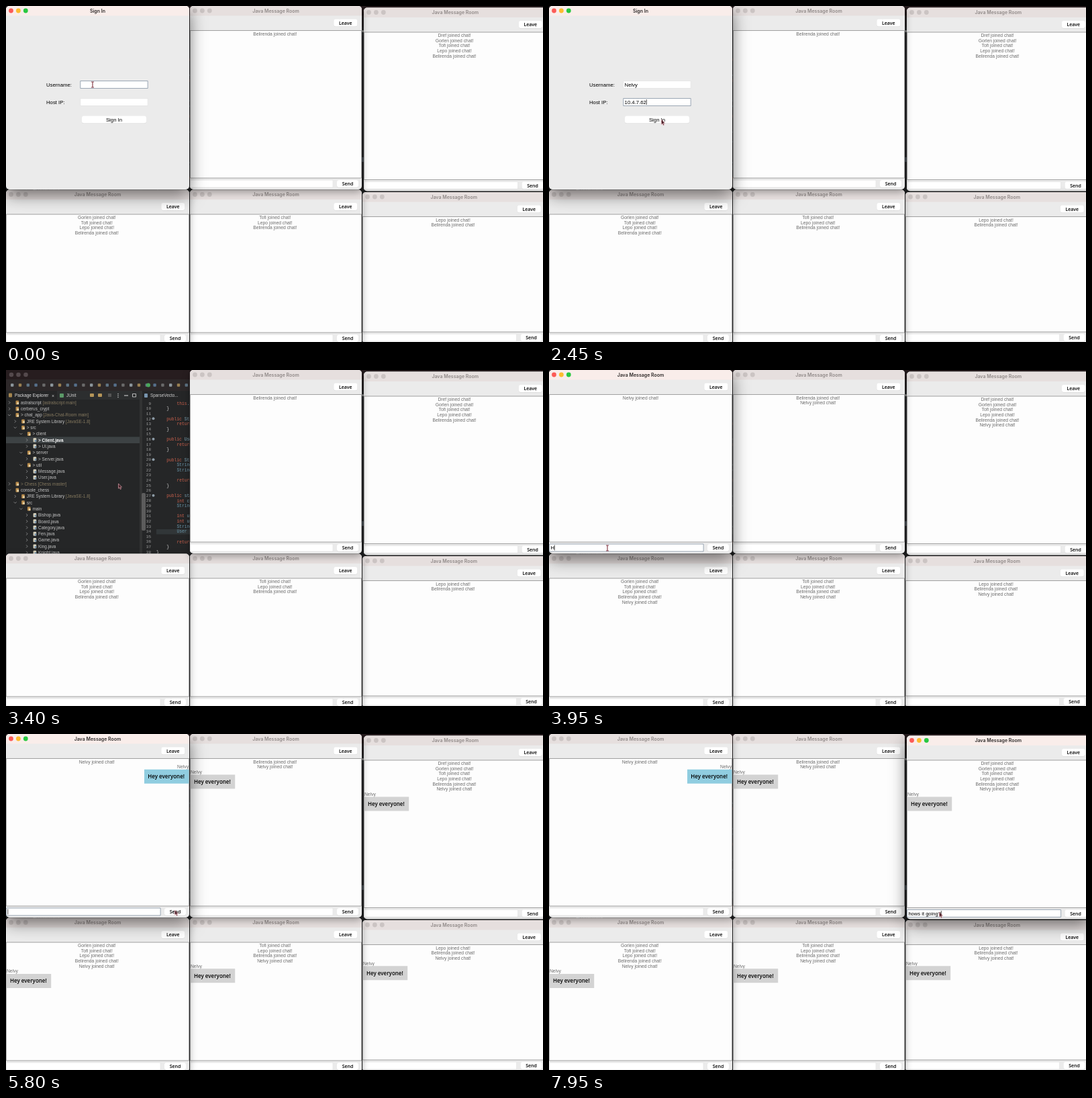
Animation of 800x500 px, one loop 8 s. Source, as an HTML page with a canvas:

```html
<!DOCTYPE html>
<html>
<head>
<meta charset="utf-8">
<style>
html, body { margin: 0; width: 100%; height: 100%; overflow: hidden; background: #221d1f; }
canvas { display: block; }
</style>
</head>
<body>
<canvas id="stage" width="800" height="500"></canvas>
<script>
const c = document.getElementById('stage').getContext('2d');
const LOOP = 8000;
const SANS = '"Liberation Sans", Arial, sans-serif';
const HUMAN = '"Open Sans", sans-serif';
const TITLE = 'Inter, sans-serif';
const MONO = '"Liberation Mono", monospace';

const USER = 'Nelvy', HOST = '10.4.7.62';
const HELLO = 'Hey everyone!', REPLY = 'hows it going?';
const CLOSE_AT = 3250, JOIN_AT = 3450, SEND_AT = 5750, SWITCH_AT = 6250;

const joined = ['Dref', 'Gorlen', 'Tofi', 'Lepo', 'Belirenda'];
// first: index of the first join notice the room has seen
const rooms = [
  { x: 0, y: 0, w: 273, h: 273, first: 5 },
  { x: 274, y: 0, w: 256, h: 273, first: 4 },
  { x: 533, y: 2.5, w: 272.5, h: 273, first: 0 },
  { x: 0, y: 273.5, w: 273, h: 229.5, first: 1 },
  { x: 274, y: 273.5, w: 256, h: 229.5, first: 2 },
  { x: 531, y: 277, w: 272.5, h: 225, first: 3 },
];
const backToFront = [2, 5, 4, 3, 1, 0];

// time, x, y of the pointer
const pointerPath = [
  [950, 129, 117], [1500, 133, 143], [2150, 133, 143], [2430, 168, 169],
  [3400, 168, 169], [3800, 87, 265], [5300, 87, 265], [5650, 252, 262],
  [5850, 252, 262], [6230, 582, 265],
];

const tree = [
  '0>astralscript| [astralscript main]', '0>cerberus_crypt', '0v> chat_app| [Java-Chat-Room main]',
  '1>JRE System Library| [JavaSE-1.8]', '1v> src', '2v> client', '3>> Client.java', '3>> UI.java',
  '2v> server', '3>> Server.java', '2v> util', '3>Message.java', '3>User.java',
  '0>|> Chess [Chess master]', '0vconsole_chess', '1>JRE System Library| [JavaSE-1.8]', '1vsrc', '2vmain',
  ...['Bishop', 'Board', 'Category', 'Fen', 'Game', 'King', 'Knight'].map(n => `3>${n}.java`),
];

const code = `        this.
    }

    public String
        return
    }

    public User
        return
    }

    public String
        String
        String

        return
    }

    public static
        int c
        String

        int u
        int u
        String
        User

        return
    }
}`.split('\n');

function rect(x, y, w, h, fill, radius = 0, stroke) {
  c.beginPath();
  c.roundRect(x, y, w, h, radius);
  if (fill) { c.fillStyle = fill; c.fill(); }
  if (stroke) { c.strokeStyle = stroke; c.lineWidth = 0.8; c.stroke(); }
}

function dot(x, y, r, fill) {
  c.beginPath();
  c.arc(x, y, r, 0, 7);
  c.fillStyle = fill;
  c.fill();
}

function line(points, color, width) {
  c.beginPath();
  points.forEach(([x, y]) => c.lineTo(x, y));
  c.strokeStyle = color;
  c.lineWidth = width;
  c.stroke();
}

// y is the middle of the capitals; returns the width
function text(s, x, y, size, family, color = '#111', align = 'left', weight = 400) {
  c.font = `${weight} ${size}px ${family}`;
  c.textAlign = align;
  c.fillStyle = color;
  c.fillText(s, x, y + size * 0.36);
  return c.measureText(s).width;
}

function button(label, x, y, w, family, size, weight) {
  rect(x - w / 2, y - 5.2, w, 11.2, '#d2d2d2', 3);
  rect(x - w / 2, y - 5.5, w, 11, '#fff', 3);
  text(label, x, y, size, family, '#000', 'center', weight);
}

function field(x, y, w, value, focused, caret, size) {
  rect(x, y - 5.5, w, 11, '#fff', 0, focused ? '#8593a4' : '#e4e4e4');
  const end = x + 1.8 + text(value, x + 1.8, y, size, SANS, '#000');
  if (caret) line([[end + 0.4, y - 4], [end + 0.4, y + 4]], '#111', 0.7);
}

function frame({ x, y, w, h }, title, active) {
  c.save();
  c.shadowColor = active ? 'rgba(0,0,0,.55)' : 'rgba(0,0,0,.35)';
  c.shadowBlur = active ? 24 : 12;
  c.shadowOffsetY = active ? 8 : 4;
  rect(x, y, w, h, '#ebebeb', 5);
  c.restore();
  rect(x, y, w, 14.5, active ? '#f9edea' : '#e6dfde', [5, 5, 0, 0]);
  const lights = active ? ['#fc5b57', '#fdbc2e', '#28c840'] : Array(3).fill('#cbc4c3');
  lights.forEach((color, i) => dot(x + 7.5 + i * 10.9, y + 7, 3.4, color));
  text(title, x + w / 2, y + 7, 7, TITLE, active ? '#2c2827' : '#8f8887', 'center', 600);
}

function room(r, t, own, active, draft, focused) {
  const { x, y, w, h } = r, right = x + w, bottom = y + h, top = y + 36.5;
  const sent = t >= SEND_AT;
  frame(r, 'Java Message Room', active);
  button('Leave', right - 24.2, y + 25, 35, HUMAN, 7, 600);
  rect(x + 0.4, top, w - 0.8, bottom - 17 - top, '#fdfdfd', 0, '#8b8b8b');

  const lines = joined.slice(r.first);
  if (t >= JOIN_AT) lines.push(USER);
  const lineY = i => top + 4.7 + i * 7.65;
  const middle = x + w / 2 - (own && !sent ? 0 : 1.2);
  lines.forEach((name, i) => text(`${name} joined chat!`, middle, lineY(i), 6.75, SANS, '#6c6c6c', 'center'));

  if (sent) {
    const ly = lineY(lines.length), left = own ? right - 67 : x + 0.7;
    text(USER, own ? right - 1 : x + 1, ly, 6.75, SANS, '#6c6c6c', own ? 'right' : 'left');
    rect(left, ly + 4, 66.5, 21, own ? '#90cde0' : '#d3d3d3');
    text(HELLO, left + 5.3, ly + 14.5, 8, HUMAN, '#000', 'left', 600);
  }
  field(x + 0.6, bottom - 8.5, w - 43.5, draft, focused, focused, 7.6);
  button('Send', right - 21, bottom - 8.5, 32, HUMAN, 7, 600);
}

function signIn(t) {
  const onHost = t >= 1700;
  const blink = t < 2600 || (t >= 2825 && t < 3000);
  frame(rooms[0], 'Sign In', true);
  text('Username:', 60, 117, 7.75, SANS, '#000');
  text('Host IP:', 60, 143, 7.75, SANS, '#000');
  field(110.8, 117, 100.4, typed(USER, 300, 100, t), !onHost, !onHost && t >= 100, 7.75);
  field(110.8, 143, 100.4, typed(HOST, 1950, 40, t), onHost, onHost && blink, 7.75);
  button('Sign In', 161, 169, 96, SANS, 7.75);
}

function editor() {
  rect(0, 0, 800, 500, '#252627');
  rect(0, 0, 800, 14, '#271d1f');
  rect(0, 14, 800, 17, '#2d2829');
  rect(0, 31, 800, 13, '#2c2e2f');
  [8, 18.5, 29.5].forEach(x => dot(x, 7, 3.3, '#54494c'));

  const hues = ['#8d979d', '#5f7586', '#6b6b6b', '#9b8152', '#56708c'];
  for (let i = 0; i < 23; i++) rect(7 + i * 11.8, 20.3, 4.4, 4.4, hues[i * 3 % 5], 1);
  dot(212, 22.5, 3, '#4aa85a');

  rect(0, 31, 76, 13, '#252627');
  rect(4, 34.5, 5, 6, '#a5864f', 1);
  text('Package Explorer', 13, 38, 6.4, SANS, '#e0e0e0');
  text('×', 68, 38, 7, SANS, '#ccc');
  rect(80, 35, 6, 6, '#5b9a68', 1);
  text('JUnit', 90, 38, 6.4, SANS, '#d0d0d0');
  [125, 137].forEach(x => rect(x, 35, 6, 5, '#b59659', 1));
  rect(152, 35, 5, 5, '#555');
  [35.5, 38, 40.5].forEach(y => dot(167, y, 0.7, '#ddd'));
  line([[176, 38], [182, 38]], '#ddd', 1);
  rect(188.5, 35.5, 5, 4.5, null, 0, '#ddd');

  tree.forEach((row, i) => {
    const depth = +row[0], y = 48.5 + i * 9.3, x = 5 + depth * 8.7;
    const [name, note = ''] = row.slice(2).split('|');
    if (i === 6) rect(0, y - 4.7, 199, 9.3, '#3d4244');
    const mark = row[1] === 'v' ? [[-2, -1], [0, 1], [2, -1]] : [[-1, -2], [1, 0], [-1, 2]];
    line(mark.map(([a, b]) => [x + a, y + b]), '#999', 0.8);
    rect(x + 9.5, y - 3, 4.6, 6, depth > 2 ? '#d6d0bb' : '#b98c4c', 1);
    rect(x + 11.5, y - 0.5, 2.6, 3, depth > 2 ? '#7794ae' : '#e4d5ae');
    const w = text(name, x + 17, y, 6.4, SANS, i === 6 ? '#fff' : '#c4c4c4', 'left', i === 6 ? 700 : 400);
    text(note, x + 17 + w, y, 6.4, SANS, '#85795f');
  });

  rect(199, 31, 4, 243, '#323333');
  rect(202, 183, 6, 56, '#5c5c5c', 2);
  rect(203, 31, 71, 13, '#252627');
  rect(206, 35, 5, 6, '#7794ae', 1);
  text('SparseVecto...', 215, 38, 6.4, SANS, '#d0d0d0');
  rect(224, 237, 50, 7.6, '#313638');
  code.forEach((s, i) => {
    const y = 49.5 + i * 7.62, word = s.trim();
    text(i + 9, 216, y, 6, MONO, '#a0a0a0', 'right');
    if (/^public/.test(word)) dot(219.5, y, 2, '#8c9aa5');
    const keyword = /^(public|return|int|this)/.exec(word);
    const color = keyword ? '#c9604c' : /^[SU]/.test(word) ? '#6a96aa' : '#d0d0d0';
    const x = 224 + (s.length - s.trimStart().length) * 3.8;
    const head = keyword ? keyword[0] : word;
    const w = text(head, x, y, 6.3, MONO, color);
    text(word.slice(head.length), x + w, y, 6.3, MONO, '#7fa6b8');
  });
  rect(530, 36, 3, 3, '#8a8a8a');
  rect(530, 225, 3, 7, '#4a5157');
}

function typed(s, start, step, t) {
  return s.slice(0, Math.max(0, Math.floor((t - start) / step) + 1));
}

function pointer(t) {
  let [, x, y] = pointerPath[0];
  pointerPath.slice(1).forEach(([end, bx, by], i) => {
    const [start, ax, ay] = pointerPath[i];
    if (t < start) return;
    const k = Math.min(1, (t - start) / (end - start)), e = k * k * (3 - 2 * k);
    x = ax + (bx - ax) * e;
    y = ay + (by - ay) * e;
  });
  if (t < 2230 || (t >= 3780 && t < 5330)) {
    line([[x, y - 4], [x, y + 4]], '#7c2c39', 1.1);
    [-4, 4].forEach(d => line([[x - 2, y + d], [x + 2, y + d]], '#7c2c39', 0.9));
    return;
  }
  c.beginPath();
  [[0, 0], [0, 7.3], [1.6, 5.8], [2.8, 8.6], [4, 8], [2.9, 5.4], [5, 5.2]]
    .forEach(([a, b]) => c.lineTo(x - 0.5 + a, y + b));
  c.closePath();
  c.fillStyle = '#4a2028';
  c.fill();
  c.strokeStyle = '#d8a3ab';
  c.lineWidth = 0.7;
  c.stroke();
}

function draw(t) {
  editor();
  const active = t < CLOSE_AT ? 0 : t < JOIN_AT ? -1 : t < SWITCH_AT ? 0 : 2;
  const order = [...backToFront].sort((a, b) => (a === active) - (b === active));
  for (const i of order) {
    if (i === 0 && t < JOIN_AT) {
      if (t < CLOSE_AT) signIn(t);
      continue;
    }
    let draft = '';
    if (i === 0 && t < SEND_AT) draft = typed(HELLO, 3930, 70, t);
    if (i === 2) draft = typed(REPLY, 6950, 70, t);
    room(rooms[i], t, i === 0, i === active, draft, i === active && t >= 3850);
  }
  pointer(t);
}

function tick() {
  draw(performance.now() % LOOP);
  requestAnimationFrame(tick);
}
tick();
</script>
</body>
</html>
```
